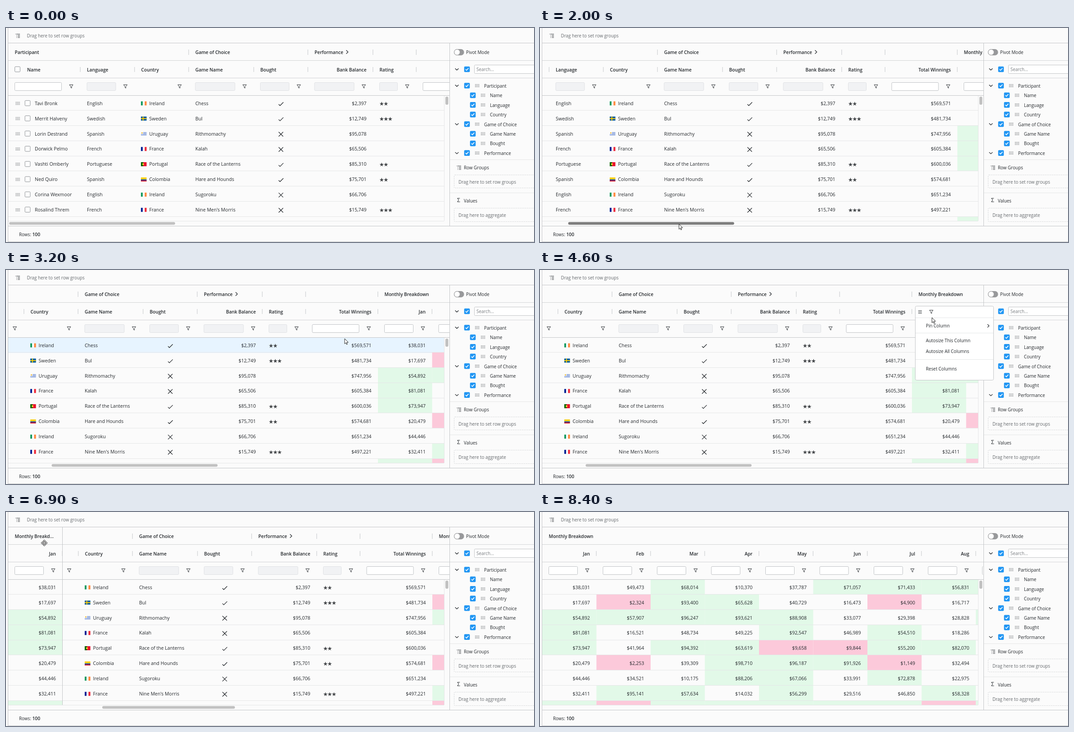
Animation, 1174 px wide and 477 px high, one loop 9 s. Source, as an HTML page with a canvas:

```html
<!DOCTYPE html>
<html lang="en">
<head>
<meta charset="utf-8">
<title>Data grid</title>
<style>
html, body { margin: 0; width: 100%; height: 100%; overflow: hidden; background: #fbfbfb; }
canvas { display: block; width: 1174px; height: 477px; }
</style>
</head>
<body>
<canvas id="stage" width="1174" height="477"></canvas>
<script>
const g = document.getElementById('stage').getContext('2d');
const LOOP = 9000, LEFT = 5, RIGHT = 986, ROWS_RIGHT = 974, PIN = 121;
const BG = '#fbfbfb', INK = '#24282c', LINE = '#c3c5c7', SOFT = '#e5e6e7', BLUE = '#2196f3';
const FONT = '"Open Sans", "Noto Sans", sans-serif';
const BODY = '10.5px ' + FONT, SMALL = '9.9px ' + FONT, BOLD = '600 10.2px ' + FONT;

const people = [
  ['Tavi Bronk', 'English', 'Ireland', 'Chess', 1, 2397, 2, 569571],
  ['Merrit Halveny', 'Swedish', 'Sweden', 'Bul', 1, 12749, 3, 481734],
  ['Lorin Destrand', 'Spanish', 'Uruguay', 'Rithmomachy', 0, 95078, 0, 747956],
  ['Dorwick Pelmo', 'French', 'France', 'Kalah', 0, 65506, 0, 605384],
  ['Vashti Omberly', 'Portuguese', 'Portugal', 'Race of the Lanterns', 1, 85310, 2, 600036],
  ['Ned Quiro', 'Spanish', 'Colombia', 'Hare and Hounds', 1, 75701, 2, 574681],
  ['Corina Wexmoor', 'English', 'Ireland', 'Sugoroku', 0, 66706, 0, 651234],
  ['Rosalind Threm', 'French', 'France', "Nine Men's Morris", 0, 15749, 3, 497221]
];
const monthly = [
  '38031 49473 68014 10370 37787 71057 71433 56831 60000',
  '17697 2324 93400 65628 40729 16473 4900 16717 20000',
  '54892 57907 96247 93621 88908 33077 29398 28828 60000',
  '81081 16521 48734 49225 92547 46989 54510 18286 20000',
  '73947 41964 94392 63619 9658 9844 55200 82070 20000',
  '20479 2253 39309 98710 96187 91926 1149 32494 20000',
  '44446 34521 10175 88206 67066 33991 72878 22975 20000',
  '32411 95141 57634 14032 56299 29516 46850 58328 20000',
  '60000 5000 60000 60000 60000 60000 60000 5000 60000'
].map(s => s.split(' ').map(Number));

// label, width, kind, group, filter style (0 none, 1 disabled, 2 editable)
const cols = [
  ['Name', 160.5, 'name', 'Participant', 2],
  ['Language', 120.5, 'text', 'Participant', 1],
  ['Country', 120.5, 'flag', 'Participant', 0],
  ['Game Name', 144.5, 'text', 'Game of Choice', 1],
  ['Bought', 120.5, 'mark', 'Game of Choice', 1],
  ['Bank Balance', 144.5, 'money', 'Performance', 1],
  ['Rating', 96.5, 'stars', ' ', 1],
  ['Total Winnings', 160.5, 'money', '  ', 2],
  ...'Jan Feb Mar Apr May Jun Jul Aug Sep'.split(' ')
    .map(m => [m, 120.5, 'month', 'Monthly Breakdown', 2])
].map(([label, w, kind, group, filter], i) => ({ label, w, kind, group, filter, i }));
const months = cols.slice(8);

const rowTop = r => Math.round(150.5 + r * 33.75);
const clamp = v => Math.max(0, Math.min(1, v));
const ease = p => p < 0.5 ? 4 * p ** 3 : 1 - 4 * (1 - p) ** 3;

// Piecewise interpolation over [time, ...values]
function track(t, keys) {
  let k = 1;
  while (k < keys.length - 1 && t > keys[k][0]) k++;
  const a = keys[k - 1], b = keys[k], p = clamp((t - a[0]) / (b[0] - a[0]));
  return a.slice(1).map((v, i) => v + (b[i + 1] - v) * p);
}

function box(x, y, w, h, color) { g.fillStyle = color; g.fillRect(x, y, w, h); }
function hline(x1, x2, y, color) { box(x1, y, x2 - x1, 1, color); }
function vline(x, y1, y2, color) { box(x, y1, 1, y2 - y1, color); }
function rounded(x, y, w, h, r, fill, stroke) {
  g.beginPath();
  g.roundRect(x, y, w, h, r);
  if (fill) { g.fillStyle = fill; g.fill(); }
  if (stroke) { g.strokeStyle = stroke; g.lineWidth = 1; g.stroke(); }
}
function text(s, x, y, font = BODY, color = INK, align = 'left') {
  g.font = font; g.fillStyle = color; g.textAlign = align;
  g.fillText(s, x, y + 3.7);
}
function poly(x, y, pts, stroke, width = 1.2, fill = null) {
  g.beginPath();
  for (let i = 0; i < pts.length; i += 2) g.lineTo(x + pts[i], y + pts[i + 1]);
  if (fill) { g.closePath(); g.fillStyle = fill; g.fill(); }
  if (stroke) { g.strokeStyle = stroke; g.lineWidth = width; g.stroke(); }
}
function clipped(x1, x2, y1, y2, paint) {
  if (x2 <= x1) return;
  g.save();
  g.beginPath();
  g.rect(x1, y1, x2 - x1, y2 - y1);
  g.clip();
  paint();
  g.restore();
}

function dots(x, y) {
  for (let i = 0; i < 4; i++)
    for (let j = -1; j < 2; j++) box(x + i * 2.6, y + j * 2.6 - 0.7, 1.4, 1.4, '#7d8083');
}
function checkbox(x, y, on) {
  if (!on) return rounded(x - 5.8, y - 5.8, 11.6, 11.6, 1.5, '#fff', '#8b8f93');
  rounded(x - 6.3, y - 6.3, 12.6, 12.6, 2, BLUE);
  poly(x, y, [-3.2, 0, -1, 2.4, 3.4, -2.5], '#fff', 1.6);
}
function funnel(x, y) {
  poly(x, y, [-4, -3.5, 4, -3.5, 1, 0.5, 1, 4, -1, 2.8, -1, 0.5, -4, -3.5, 4, -3.5], '#33373b', 1);
}
function groupIcon(x, y) {
  for (let i = 0; i < 4; i++) {
    const inset = i ? 3 : 0;
    hline(x + inset + 2, x + 10, y - 4 + i * 2.6, '#4a4e52');
    box(x + inset - (i ? 1 : 0), y - 4 + i * 2.6, 1.2, 1, '#4a4e52');
  }
}
function star(x, y) {
  const pts = [];
  for (let i = 0; i < 10; i++) {
    const a = -Math.PI / 2 + i * Math.PI / 5, r = i % 2 ? 2 : 4.9;
    pts.push(Math.cos(a) * r, Math.sin(a) * r);
  }
  poly(x, y, pts, null, 0, '#45484b');
}
function flag(name, x, y) {
  const w = 12.6, h = 9;
  const bars = c => c.forEach((k, i) => box(x + i * w / 3, y, w / 3, h, k));
  const disc = (cx, cy, r, c) => {
    g.beginPath(); g.arc(x + cx, y + cy, r, 0, 7); g.fillStyle = c; g.fill();
  };
  if (name === 'Ireland') bars(['#169b62', '#fff', '#ff883e']);
  if (name === 'France') bars(['#002395', '#fff', '#ed2939']);
  if (name === 'Sweden') {
    box(x, y, w, h, '#005b9f'); box(x + 3.8, y, 2, h, '#fecc00'); box(x, y + 3.6, w, 1.9, '#fecc00');
  }
  if (name === 'Portugal') {
    box(x, y, w, h, '#e8112d'); box(x, y, 5, h, '#006600'); disc(5, 4.5, 2, '#fde02f');
  }
  if (name === 'Colombia') {
    box(x, y, w, 4.5, '#fcd116'); box(x, y + 4.5, w, 2.3, '#003893'); box(x, y + 6.8, w, 2.2, '#ce1126');
  }
  if (name === 'Uruguay') {
    box(x, y, w, h, '#fff');
    for (let i = 0; i < 4; i++) box(x, y + 1 + i * 2, w, 1, '#4f76c7');
    box(x, y, 5, 5, '#fff'); disc(2.5, 2.5, 1.6, '#e9b93a');
  }
}

function cell(c, x, r, y) {
  if (c.kind === 'month') {
    const v = monthly[r][c.i - 8], top = rowTop(r);
    const tint = v > 50000 ? '#e2f9e8' : v < 10000 ? '#fcc9da' : null;
    if (tint) box(x, top, c.w, rowTop(r + 1) - top - 1, tint);
    if (r < 8) text('$' + v.toLocaleString('en-US'), x + c.w - 14.5, y, BODY, INK, 'right');
    return;
  }
  if (r > 7) return;
  const v = people[r][c.i], tx = x + 14.5;
  if (c.kind === 'name') {
    dots(x + 16.5, y); checkbox(x + 43, y - 0.5); text(v, x + 59, y);
  } else if (c.kind === 'text') text(v, tx, y);
  else if (c.kind === 'flag') { flag(v, tx - 0.5, y - 4.5); text(v, tx + 18, y); }
  else if (c.kind === 'money') text('$' + v.toLocaleString('en-US'), x + c.w - 14.5, y, BODY, INK, 'right');
  else if (c.kind === 'stars') { for (let i = 0; i < v; i++) star(tx + 4.8 + i * 9.5, y + 1); }
  else {
    const cx = x + c.w / 2;
    if (v) poly(cx, y + 1, [-5, 1, -2, 4, 5.5, -3.5], INK, 1.3);
    else {
      poly(cx, y + 1, [-5, -5, 5, 5], INK, 1.3);
      poly(cx, y + 1, [5, -5, -5, 5], INK, 1.3);
    }
  }
}

function headerCell(c, x) {
  const right = c.kind === 'money' || c.kind === 'month';
  if (c.kind === 'name') { checkbox(x + 20.5, 92); text(c.label, x + 42, 93, BOLD); }
  else if (right) text(c.label, x + c.w - 14.5, 93, BOLD, INK, 'right');
  else text(c.label, x + 14.5, 93, BOLD);
  box(x + c.w - 1, 87, 1.5, 11, '#d6d8da');
  if (c.filter) {
    const on = c.filter === 2;
    rounded(x + 14.5, 121.5, c.w - 56.5, 18, 2, on ? '#fff' : '#f1f2f4', on ? '#bfc2c5' : '#dfe1e4');
  }
  funnel(x + c.w - 20.5, 130);
}

// Draws one run of columns between two clip edges
function columns(list, x0, from, to, opts = {}) {
  const placed = [];
  let x = x0;
  for (const c of list) {
    placed.push([c, x + (c.kind === 'month' ? opts.slide || 0 : 0)]);
    x += c.w;
  }
  clipped(from, Math.min(to, RIGHT), 34, 150, () => {
    let last = null;
    for (const [c, cx] of placed) {
      if (c.group !== last) {
        if (last) box(cx - 1 - (c.kind === 'month' ? opts.slide || 0 : 0), 48, 1.5, 12, '#d6d8da');
        text(opts.short ? 'Monthly Breakd...' : c.group, cx + 14.5, 54, BOLD);
        if (c.group === 'Performance') poly(cx + 87, 53.5, [-2, -4, 2, 0, -2, 4], INK, 1.3);
        last = c.group;
      }
      if (!opts.bare) headerCell(c, cx);
    }
  });
  clipped(from, Math.min(to, ROWS_RIGHT), 151, 430, () => {
    for (const [c, cx] of placed)
      if (cx < ROWS_RIGHT && cx + c.w > from)
        for (let r = 0; r < 9; r++) cell(c, cx, r, 168 + r * 33.9);
  });
}

function sidebar() {
  box(987, 34, 187, 407, BG);
  rounded(996, 47, 22.5, 14, 7, '#98999b');
  g.beginPath(); g.arc(1003, 54, 6.4, 0, 7); g.fillStyle = '#fff'; g.fill();
  g.strokeStyle = '#98999b'; g.lineWidth = 1; g.stroke();
  text('Pivot Mode', 1023, 54, SMALL);
  const chevron = y => poly(1002.5, y, [-3.8, -1.8, 0, 1.8, 3.8, -1.8], INK, 1.3);
  chevron(92); checkbox(1025, 92, true);
  rounded(1041.5, 82.5, 150, 19, 2, '#fff', LINE);
  text('Search...', 1046, 92.5, SMALL, '#777b7f');
  ['Participant', '-Name', '-Language', '-Country', 'Game of Choice', '-Game Name', '-Bought', 'Performance']
    .forEach((s, i) => {
      const y = 129 + i * 21.45, child = s[0] === '-', dx = child ? 13 : 0;
      if (!child) chevron(y - 0.5);
      checkbox(1025 + dx, y - 0.5, true);
      dots(1043 + dx, y - 0.5);
      text(child ? s.slice(1) : s, 1063 + dx, y, SMALL);
    });
  [72, 111].forEach(y => hline(987, 1174, y, '#d3d5d7'));
  [293, 367].forEach(y => hline(987, 1174, y, SOFT));
  groupIcon(1002, 311); text('Row Groups', 1018, 311.5, SMALL);
  text('Σ', 1003, 384.5, '12px ' + FONT); text('Values', 1018, 385.5, SMALL);
  g.setLineDash([2, 2]);
  rounded(996.5, 327.5, 200, 29, 2, null, '#cdcfd1');
  rounded(996.5, 401.5, 200, 30, 2, null, '#cdcfd1');
  g.setLineDash([]);
  text('Drag here to set row groups', 1006, 343, SMALL, '#65696d');
  text('Drag here to aggregate', 1006, 417, SMALL, '#65696d');
}

function bars(x, y) { [-3, 0, 3].forEach(d => hline(x - 4, x + 4, y + d, '#33373b')); }
function menu(t) {
  rounded(834.5, 80.5, 174, 165, 3, '#fff', LINE);
  hline(835, 1008, 106, SOFT);
  bars(845, 93); funnel(870, 93);
  if (t >= 4700) box(835, 113, 173, 23, '#e7f4ff');
  text('Pin Column', 858, 124.5, SMALL);
  poly(997, 124.5, [-2, -3.5, 1.5, 0, -2, 3.5], INK);
  text('Autosize This Column', 858, 157, SMALL);
  text('Autosize All Columns', 858, 181, SMALL);
  text('Reset Columns', 858, 220, SMALL);
  hline(835, 1008, 140, SOFT); hline(835, 1008, 199, SOFT);
  if (t < 4900) return;
  rounded(1008.5, 96.5, 121, 84, 3, '#fff', LINE);
  if (t >= 5100) box(1009, 124, 120, 23, '#e7f4ff');
  ['No Pin', 'Pin Left', 'Pin Right'].forEach((s, i) => text(s, 1033, 111 + i * 24.5, SMALL));
}

function pointer(t, x, y) {
  if (t >= 6300) {
    const arm = [];
    for (let q = 0; q < 4; q++) {
      const c = Math.round(Math.cos(q * Math.PI / 2)), s = Math.round(Math.sin(q * Math.PI / 2));
      [[-1, -1], [-1, -4], [-3, -4], [0, -7], [3, -4], [1, -4], [1, -1]]
        .forEach(([a, b]) => arm.push(a * c - b * s, a * s + b * c));
    }
    poly(x, y, arm, '#222', 1, '#fff');
  } else poly(x, y, [0, 0, 0, 11.5, 2.6, 9.2, 4.4, 13, 6, 12.3, 4.3, 8.4, 8, 8.2, 0, 0], '#222', 1, '#fff');
}
const path = [
  [200, 520, 191], [900, 300, 448], [1100, 251, 435], [1200, 251, 433], [1300, 265, 433],
  [2000, 309, 437], [2600, 347, 439], [3100, 690, 235], [3200, 753, 153], [3900, 843, 90],
  [4400, 843, 90], [4800, 900, 122], [5300, 1027, 130], [5700, 1027, 130],
  [6400, 85, 64], [6800, 85, 69], [7000, 85, 69], [7600, 110, 66]
];

function draw(t) {
  const scroll = track(t, [[1200, 0], [1300, 38], [2000, 145], [2600, 246]])[0];
  const pinned = t >= 5500, spread = clamp((t - 7000) / 500);
  const [mx, my] = track(t, path);
  const pinW = pinned ? PIN + (RIGHT - LEFT - PIN) * ease(spread) : 0;

  box(0, 0, 1174, 477, BG);

  const dragging = t >= 1200 && t < 2600;
  const hover = t >= 200 && t < 7600 && !dragging && my > 151 && my < 430 && mx < ROWS_RIGHT
    ? Math.floor((my - 151) / 33.75) : -1;
  if (hover >= 0) box(LEFT, rowTop(hover), ROWS_RIGHT - LEFT, 34, '#e7f4ff');

  const center = pinned ? cols.filter(c => c.i !== 8) : cols;
  const slide = pinned ? 120.5 * (1 - ease(clamp((t - 5387) / 273))) : 0;
  if (spread < 1) columns(center, LEFT + pinW - scroll, LEFT + pinW, RIGHT, { slide });
  const bare = pinned && t < 5700;
  if (pinned) {
    columns(spread > 0 ? months : months.slice(0, 1), LEFT, LEFT, LEFT + pinW - 1, { short: spread === 0, bare });
  }

  [72, 111].forEach(y => hline(bare ? 125 : LEFT, RIGHT, y, '#d0d2d4'));
  for (let r = 1; r < 9; r++) hline(LEFT, ROWS_RIGHT, rowTop(r) - 1, SOFT);
  hline(LEFT, ROWS_RIGHT, 430, SOFT);
  vline(ROWS_RIGHT, 151, 430, SOFT);
  if (pinned && spread < 1) vline(Math.round(LEFT + pinW - 1), 34, 430, LINE);

  rounded(977, 153, 6.5, 18, 3, '#c1c1c1');
  const held = t >= 1000 && t < 2700;
  if (!pinned) rounded(7 + scroll * 0.384, 432.5, 369, 6, 3, held ? '#7d7d7d' : '#c1c1c1');
  else if (spread === 0) rounded(214, 432.5, 295, 6, 3, '#c1c1c1');

  sidebar();
  hline(4, 1174, 33, LINE); hline(4, RIGHT, 150, LINE);
  hline(4, 1174, 441, LINE); hline(4, 1174, 476, LINE);
  vline(4, 0, 477, LINE); vline(RIGHT, 34, 441, LINE);
  groupIcon(21, 17);
  text('Drag here to set row groups', 46.5, 17.5, SMALL, '#65696d');
  text('Rows:', 29, 460, SMALL); text('100', 58.5, 460, BOLD);

  if (t >= 3800 && t < 4400) bars(846, 93);
  if (t >= 4400 && t < 5500) menu(t);
  if (t >= 200 && t < 7600) pointer(t, mx, my);
}

const start = performance.now();
function tick(now) {
  const t = Math.max(0, now - start) % LOOP;
  draw(Math.floor(t / 100) * 100);
  requestAnimationFrame(tick);
}
draw(0);
requestAnimationFrame(tick);
</script>
</body>
</html>
```
